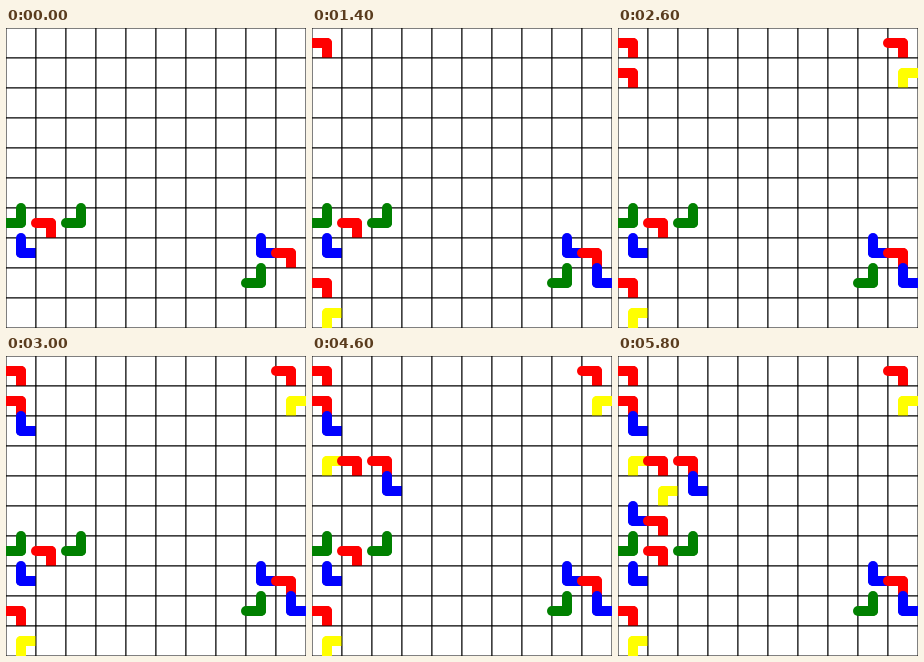
An HTML page with a canvas that plays this animation: 300x300 px, repeating every 6000 ms.

```html
<!DOCTYPE html>
<html>
<head>
<meta charset="utf-8">
<title>Tile grid</title>
<style>
  html, body { margin: 0; height: 100%; overflow: hidden; background: #fff; }
  canvas { display: block; }
</style>
</head>
<body>
<canvas id="stage" width="300" height="300"></canvas>
<script>
const ctx = document.getElementById('stage').getContext('2d');
const CELL = 30, COUNT = 10, LOOP = 6000, FIRST = 200, STEP = 400;

// Each tile joins one horizontal side (dx) to one vertical side (dy).
const kinds = {
  R: { color: 'red', dx: -1, dy: 1 },
  G: { color: 'green', dx: -1, dy: -1 },
  B: { color: 'blue', dx: 1, dy: -1 },
  Y: { color: 'yellow', dx: 1, dy: 1 }
};

// Kind, column, row
const initial = 'G06 R16 G26 B07 B87 R97 G88'.split(' ');
const added = 'B98 R08 Y09 R00 R90 Y91 R01 B02 Y03 R13 R23 B24 Y14 R15 B05'.split(' ');

function line(x1, y1, x2, y2) {
  ctx.beginPath();
  ctx.moveTo(x1, y1);
  ctx.lineTo(x2, y2);
  ctx.stroke();
}

function drawTile({ color, dx, dy }, x, y) {
  const half = CELL / 2, cx = x + half, cy = y + half;
  ctx.strokeStyle = color;
  ctx.lineWidth = 10;
  line(cx, cy, cx + dx * half, cy);
  line(cx, cy, cx, cy + dy * half);
}

function drawCell(x, y) {
  ctx.fillStyle = 'white';
  ctx.strokeStyle = 'black';
  ctx.lineWidth = 1;
  ctx.fillRect(x, y, CELL, CELL);
  ctx.strokeRect(x, y, CELL, CELL);
}

// Cells are painted in reading order, so later ones cover what spills right or down.
function drawGrid(addedCount) {
  const tiles = {};
  for (const [kind, col, row] of initial.concat(added.slice(0, addedCount))) {
    tiles[col + row] = kinds[kind];
  }
  ctx.lineCap = 'round';
  for (let row = 0; row < COUNT; row++) {
    for (let col = 0; col < COUNT; col++) {
      const x = col * CELL, y = row * CELL, tile = tiles[`${col}${row}`];
      drawCell(x, y);
      if (tile) drawTile(tile, x, y);
    }
  }
}

const start = performance.now();
function tick() {
  const time = (performance.now() - start) % LOOP;
  drawGrid(Math.max(0, Math.floor((time - FIRST) / STEP) + 1));
  requestAnimationFrame(tick);
}
tick();
</script>
</body>
</html>
```
